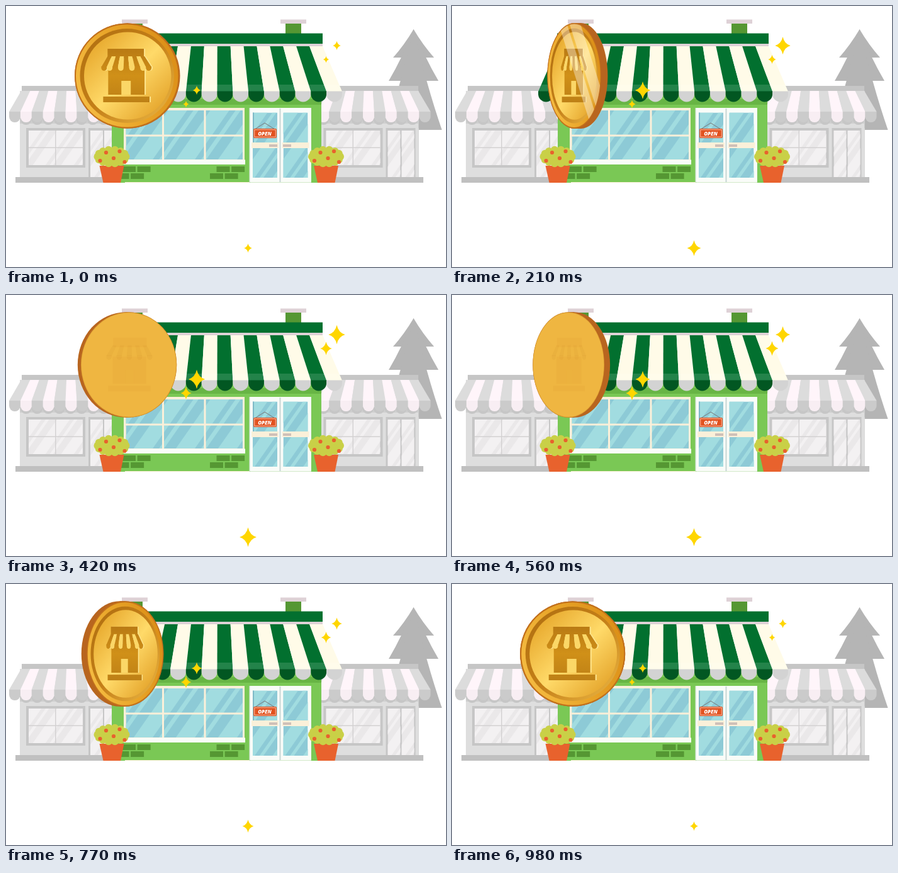
An HTML page with a canvas that plays this animation: 699x415 px, repeating every 1050 ms.

```html
<!DOCTYPE html>
<html lang="en">
<head>
<meta charset="utf-8">
<title>Shop and coin</title>
<style>
  html, body { margin: 0; width: 100%; height: 100%; overflow: hidden; background: #fff; }
  canvas { display: block; }
</style>
</head>
<body>
<canvas id="stage" width="699" height="415"></canvas>
<script>
const g = document.getElementById('stage').getContext('2d');
const LOOP = 1050, STEP = 70, TAU = Math.PI * 2;

function box(color, x0, y0, x1, y1) {
  g.fillStyle = color;
  g.fillRect(x0, y0, x1 - x0, y1 - y0);
}
function poly(color, ...p) {
  g.fillStyle = color;
  g.beginPath();
  for (let i = 0; i < p.length; i += 2) g.lineTo(p[i], p[i + 1]);
  g.fill();
}
function oval(color, x, y, rx, ry = rx) {
  g.fillStyle = color;
  g.beginPath();
  g.ellipse(x, y, rx, ry, 0, 0, TAU);
  g.fill();
}
function shifted(dx, draw) {
  g.save();
  g.translate(dx, 0);
  draw();
  g.restore();
}

// Pane with a slanted wide and thin reflection repeated at every gap.
function glass(x0, y0, x1, y1, base, light, gap) {
  const lean = (y1 - y0) * 0.7;
  g.save();
  g.beginPath();
  g.rect(x0, y0, x1 - x0, y1 - y0);
  g.clip();
  box(base, x0, y0, x1, y1);
  for (let x = x0 - lean; x < x1; x += gap)
    for (const [a, b] of [[x, x + gap * 0.45], [x + gap * 0.6, x + gap * 0.72]])
      poly(light, a, y1, b, y1, b + lean, y0, a + lean, y0);
  g.restore();
}

// Striped trapezoid: top edge a0..a1 at y0, bottom edge b0..b1 at y1.
function stripes(n, a0, a1, y0, b0, b1, y1, colors) {
  const a = (a1 - a0) / n, b = (b1 - b0) / n;
  for (let i = 0; i < n; i++)
    poly(colors[i % 2], a0 + a * i, y0, a0 + a * (i + 1), y0, b0 + b * (i + 1), y1, b0 + b * i, y1);
}
function scallops(n, x0, x1, y0, y1, colors) {
  const w = (x1 - x0) / n, r = w / 2;
  for (let i = 0; i < n; i++) {
    const x = x0 + w * i;
    g.fillStyle = colors[i % 2];
    g.beginPath();
    g.moveTo(x, y0);
    g.lineTo(x + w, y0);
    g.ellipse(x + r, y1 - r, r, r, 0, 0, Math.PI);
    g.fill();
  }
}

function tree() {
  const x = 647.5, top = 37;
  g.fillStyle = '#b5b5b5';
  for (const [y, w] of [[82, 32.5], [119, 39.5], [197, 45]]) {
    const bend = top + (y - top) * 0.55;
    g.beginPath();
    g.moveTo(x - w, y);
    g.quadraticCurveTo(x - w * 0.45, bend, x, top);
    g.quadraticCurveTo(x + w * 0.45, bend, x + w, y);
    g.fill();
  }
}

function greyShop() {
  const edge = '#c6c6c6', wall = '#dedede', pane = '#eae8e9', shine = '#f3f1f2';
  box(wall, 22, 135, 183, 273);
  box('#cfcfcf', 22, 178, 183, 187);
  scallops(9, 23, 182, 178, 189, [edge, edge]);
  box(edge, 25, 127, 182.5, 135);
  stripes(11, 24, 182.5, 135, 5, 202, 168, ['#dcdcdc', '#fff5fa']);
  scallops(11, 5, 202, 168, 185, ['#cbcbcb', '#f8eef3']);
  box(edge, 32, 194, 126, 257);
  glass(36, 198, 122, 253, pane, shine, 45);
  box('#d3d1d2', 78, 198, 79.5, 253);
  box('#d3d1d2', 36, 224.5, 122, 226);
  box(edge, 131, 194, 183, 273);
  box(wall, 178, 194, 183, 273);
  for (const x of [134, 156]) glass(x, 198, x + 20, 272, pane, shine, 40);
}

function plant() {
  const leaf = '#c9d047', red = '#e8622d';
  poly(red, 148.5, 254, 187.5, 254, 182, 281, 154.5, 281);
  oval(leaf, 168, 240, 24, 14);
  for (let a = 0; a < TAU; a += TAU / 14)
    oval(leaf, 168 + 22.5 * Math.cos(a), 239.5 + 11 * Math.sin(a), 6);
  for (const [x, y] of [[159, 233], [180.5, 231], [149.5, 246], [171, 242], [188.5, 248]])
    oval(red, x, y, 3.1);
}

function chimney() {
  box('#559733', 192, 27, 217, 44);
  box('#ded1d6', 184, 21.5, 225, 28);
}

function sign() {
  g.strokeStyle = '#777';
  g.lineWidth = 1;
  g.beginPath();
  g.moveTo(395, 196);
  g.lineTo(411, 186);
  g.lineTo(427, 196);
  g.stroke();
  g.fillStyle = '#e2521f';
  g.beginPath();
  g.roundRect(393, 195, 37, 15, 2);
  g.fill();
  g.strokeStyle = '#fbd9cb';
  g.lineWidth = 0.8;
  g.strokeRect(394.8, 196.8, 33.4, 11.4);
  g.fillStyle = '#fff';
  g.font = 'italic 900 8px "Open Sans", sans-serif';
  g.textAlign = 'center';
  g.fillText('OPEN', 411, 205.6);
}

const blue = '#8dcad6', light = '#a1dce0', white = '#f9fcf8', cream = '#fbf0d9';

function bricks(x0) {
  for (const row of [0, 1])
    for (const col of [0, 1]) {
      const x = x0 + col * 23.6 - row * 10.5, y = 255 + row * 11;
      box('#559733', x, y, x + 21, y + 9);
    }
}

function door() {
  box('#dfe9e2', 386.5, 162, 485, 280.5);
  box(white, 388, 162, 484.5, 280.5);
  box('#c8d6d5', 434.5, 163, 436.5, 280);
  for (const x of [392, 440.5]) {
    glass(x, 169.5, x + 39, 273, blue, light, 52);
    box(cream, x - 2, 217, x + 41, 226);
  }
  box('#7fb9c7', 392, 169.5, 394, 217);
  for (const x of [418, 440]) box('#cfc0b8', x, 220, x + 13, 224);
  sign();
}

function mainShop() {
  chimney();
  shifted(252, chimney);
  box('#7ac855', 168, 135, 501, 281);
  box('#68b545', 168, 148, 501, 157);
  box('#02702f', 167, 43.5, 503, 60);
  box('#ded1d6', 168, 60, 503, 64);
  stripes(16, 168.5, 503, 64, 137, 534, 136, ['#02702f', '#fffbe8']);
  poly('rgba(255,255,255,.13)', 141, 125, 529, 125, 534, 136, 137, 136);
  scallops(16, 137, 534, 135.5, 152.5, ['#025722', '#d3d3d3']);

  box(cream, 187, 162, 379, 246);
  glass(190.5, 166, 376, 244, blue, light, 67);
  for (const x of [248, 314.5]) box(cream, x, 164, x + 3, 245);
  box(cream, 188, 204.5, 378, 207.5);
  box(white, 183, 244.5, 380, 252);
  box(cream, 189, 280, 387, 281);
  bricks(185);
  bricks(334.5);
  door();
}

function scene() {
  tree();
  greyShop();
  shifted(472.5, greyShop);
  box('#c0c0c0', 15, 272, 663, 281);
  mainShop();
  plant();
  shifted(340.5, plant);
}

// Coin emblem, drawn around the coin centre.
function emblem(dark, light) {
  box(dark, -31, -43, 27, -28);
  box(dark, -30, -13, 28, 30);
  box(light, -9, 8, 6, 30);
  stripes(9, -31, 28, -31, -41, 39, -14, [dark, light]);
  scallops(9, -41, 39, -15, -8, [dark, light]);
  box(dark, -38, 33, 36, 42);
}

function linear(x0, y0, x1, y1, ...colors) {
  const fill = g.createLinearGradient(x0, y0, x1, y1);
  colors.forEach((c, i) => fill.addColorStop(i / (colors.length - 1), c));
  return fill;
}

function front(t) {
  oval('#c3711b', 0, 0, 83.5);
  oval(linear(-75, 30, 75, -30, '#f4ba40', '#e8a428', '#dc9018'), 0, 0, 81.5);
  oval(linear(-55, -55, 55, 55, '#b47212', '#c47f18', '#e2aa3a'), 0, 0, 75);
  oval(linear(-50, -50, 55, 55, '#e9ac31', '#ffda69', '#e5a52c'), 1, 0, 69.5);
  shifted(2, () => emblem('#ffe68f', '#ffe68f'));
  emblem(linear(0, -43, 0, 42, '#b97a14', '#d09018', '#bd8016'), '#fbd767');

  // reflection sweeping over the face
  g.beginPath();
  g.arc(0, 0, 82, 0, TAU);
  g.clip();
  const sweep = (t - 140) * 1.07;
  for (const [a, b] of [[-38, -4], [-72, -46]])
    poly('rgba(255,255,255,.36)', sweep + a - 53, -85, sweep + b - 53, -85,
      sweep + b + 53, 85, sweep + a + 53, 85);
}

function back() {
  oval('#d99a30', 0, 0, 83.5);
  oval('#efb641', 0, 0, 82.5);
  g.globalAlpha = 0.06;
  g.scale(-1, 1);
  emblem('#b06a10', '#efb641');
}

// One full turn with sine easing; the front and back discs are joined by the rim.
function coin(t) {
  const a = Math.PI * (1 - Math.cos(Math.PI * (0.075 + 0.955 * t / LOOP)));
  const s = Math.sin(a), c = Math.cos(a), y = 111, rim = '#b8651f';
  const rx = Math.max(0.5, Math.abs(c) * 83.5), ry = 83.5 + 0.5 * Math.abs(s);
  const near = 191.8 + 2.5 * Math.sin(2 * a), far = near + 12.5 * s;
  oval(rim, near, y, rx, ry);
  oval(rim, far, y, rx, ry);
  box(rim, near, y - ry, far, y + ry);
  g.save();
  g.translate(c > 0 ? near : far, y);
  g.scale(rx / 83.5, ry / 83.5);
  if (c > 0) front(t); else back();
  g.restore();
}

// x, y, smallest radius, and a power that sets when the star peaks
const stars = [
  [525.5, 63, 7.2, 0.63], [508.5, 85, 5.3, 1.05], [303, 134, 7.2, 0.63],
  [286, 156, 5.3, 1.2], [384.5, 385, 7.2, 0.756]
];
function star(t, [x, y, size, power]) {
  const r = size * (1 + 1.15 * Math.sin(Math.PI * (t / LOOP) ** power) ** 2);
  const w = r * 0.87, k = 0.2;
  g.fillStyle = '#ffd600';
  g.beginPath();
  g.moveTo(x, y - r);
  for (const [u, v] of [[1, -1], [1, 1], [-1, 1], [-1, -1]]) {
    const flat = u === -v;
    g.quadraticCurveTo(x + u * w * k, y + v * r * k, flat ? x + u * w : x, flat ? y : y + v * r);
  }
  g.fill();
}

const start = performance.now();
function frame() {
  const now = Math.max(0, performance.now() - start) % LOOP;
  const t = Math.floor(now / STEP) * STEP;
  box('#fff', 0, 0, 699, 415);
  scene();
  coin(t);
  stars.forEach(s => star(t, s));
  requestAnimationFrame(frame);
}
frame();
</script>
</body>
</html>
```
